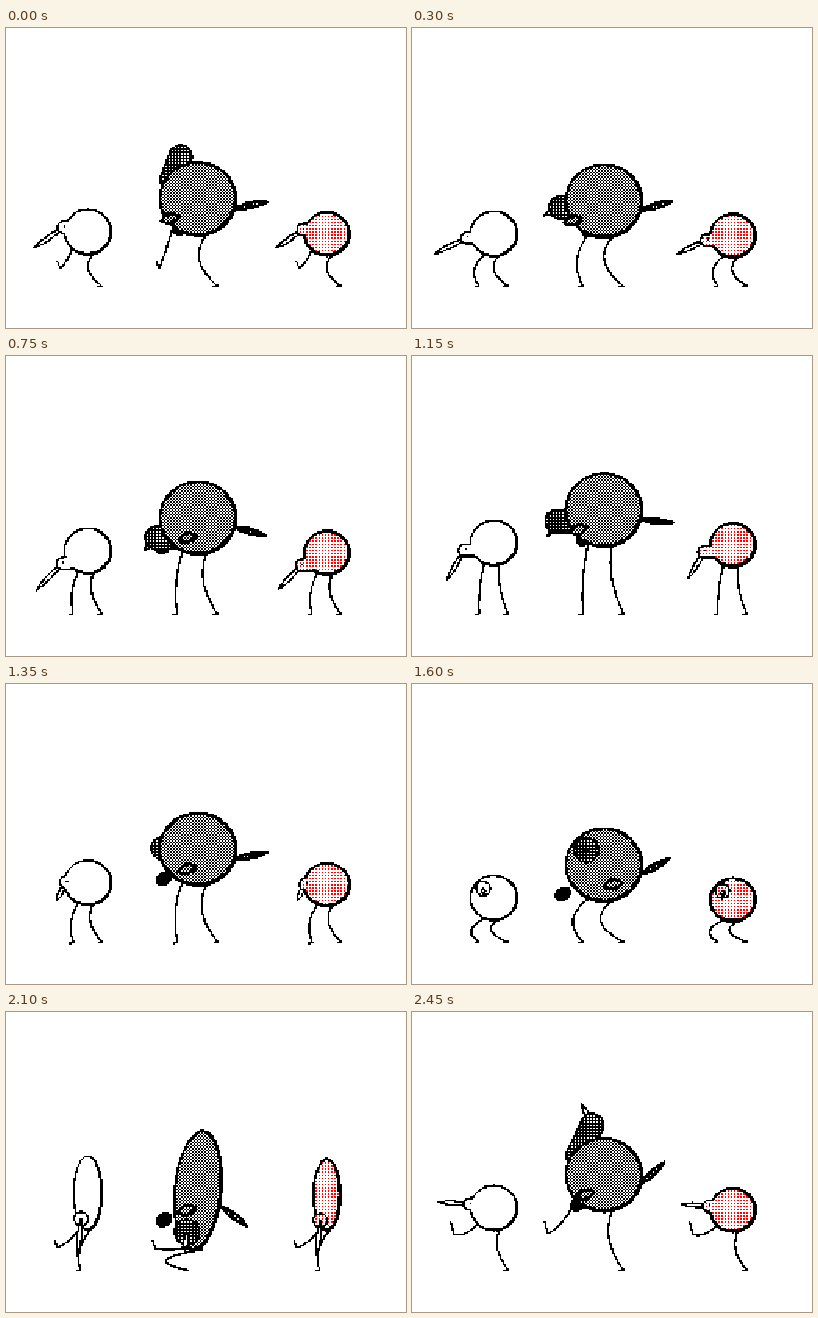
Animation of 400 by 300 pixels, one loop 2500 ms. Source, as an HTML page with a canvas:

```html
<!DOCTYPE html>
<html lang="en">
<head>
<meta charset="utf-8">
<title>Dancing birds</title>
<style>
html, body { margin: 0; width: 100%; height: 100%; overflow: hidden; background: #fff; }
canvas { display: block; width: 400px; height: 300px; image-rendering: pixelated; }
</style>
</head>
<body>
<canvas id="stage" width="256" height="192"></canvas>
<script>
const LOOP = 2500, STEP = 50, GROUND = 258, PIXEL = 400 / 256;
const ctx = document.getElementById('stage').getContext('2d', { willReadFrequently: true });

// A two-by-two halftone aligned to the coarse pixels.
function halftone(base, dot, ...dots) {
  const tile = document.createElement('canvas');
  tile.width = tile.height = 2;
  const c = tile.getContext('2d');
  c.fillStyle = base;
  c.fillRect(0, 0, 2, 2);
  c.fillStyle = dot;
  for (const [x, y] of dots) c.fillRect(x, y, 1, 1);
  const pattern = ctx.createPattern(tile, 'repeat');
  pattern.setTransform(new DOMMatrix().scale(PIXEL));
  return pattern;
}
const GREY = halftone('#fff', '#000', [0, 0], [1, 1]);
const DARK = halftone('#000', '#fff', [0, 0]);
const RED = halftone('#fff', '#f00', [0, 0]);

const birds = [
  { x: 82, y: 204, r: 24.5, fill: '#fff', headFill: '#fff', line: 2.5, headR: 5, beak: 1, stride: 1, legLength: 48, dip: 0, rear: 0 },
  { x: 192, y: 171, r: 39.5, fill: GREY, headFill: DARK, line: 3.2, headR: 10.5, beak: 0.5, stride: 1.4, legLength: 64, dip: 50, rear: 1 },
  { x: 321, y: 206, r: 24, fill: RED, headFill: RED, line: 3.2, headR: 5, beak: 0.9, stride: 1, legLength: 48, dip: 0, rear: 0 }
];

// The shared dance. Head is in body radii, tail is an angle, the rest is in pixels.
const poses = [
  { t: 0, bob: 0, width: 1, headX: -1, headY: -0.2, beakX: -30, beakY: 21, rear: 0.8, lift: 18, tail: -0.2, wing: -28 },
  { t: 300, bob: 2, width: 1, headX: -1.1, headY: 0.17, beakX: -33, beakY: 16, rear: 0, lift: 0, tail: -0.28, wing: -31 },
  { t: 750, bob: -9, width: 1, headX: -1.05, headY: 0.52, beakX: -26, beakY: 27, rear: 0, lift: 0, tail: 0.25, wing: -10 },
  { t: 1150, bob: -17, width: 1, headX: -1.2, headY: 0.3, beakX: -18, beakY: 30, rear: 0, lift: 0, tail: 0.09, wing: -25 },
  { t: 1600, bob: 10, width: 1, headX: -0.45, headY: -0.4, beakX: 1, beakY: 5, rear: 0, lift: 0, tail: -0.5, wing: 9 },
  { t: 2100, bob: -23, width: 0.62, headX: -0.45, headY: 0.68, beakX: -4, beakY: 38, rear: 0, lift: 22, tail: 0.65, wing: -11 },
  { t: 2450, bob: -8, width: 1, headX: -1, headY: -0.17, beakX: -31, beakY: -2, rear: 1, lift: 36, tail: -0.75, wing: -19 }
];

// Cyclic cubic interpolation with softened tangents.
function poseAt(t) {
  const n = poses.length;
  const key = k => poses[(k + n) % n];
  const time = k => key(k).t + LOOP * Math.floor(k / n);
  let i = n - 1;
  while (poses[i].t > t) i--;
  const h = time(i + 1) - time(i), u = (t - time(i)) / h, v = 1 - u;
  const result = {};
  for (const name in poses[i]) {
    const slope = k => (key(k + 1)[name] - key(k)[name]) / (time(k + 1) - time(k));
    const tangent = k => {
      const before = time(k) - time(k - 1), after = time(k + 1) - time(k);
      return 0.5 * (slope(k - 1) * after + slope(k) * before) / (before + after);
    };
    result[name] = key(i)[name] * v * v * (1 + 2 * u) + key(i + 1)[name] * u * u * (3 - 2 * u)
      + h * u * v * (tangent(i) * v - tangent(i + 1) * u);
  }
  return result;
}

function ellipse(x, y, rx, ry, fill, angle = 0) {
  ctx.beginPath();
  ctx.ellipse(x, y, rx, ry, angle, 0, 2 * Math.PI);
  ctx.fillStyle = fill;
  ctx.fill();
}

function stroke(width, color = '#000') {
  ctx.lineWidth = width;
  ctx.strokeStyle = color;
  ctx.stroke();
}

function capsule(x0, y0, x1, y1, radius, color) {
  ctx.beginPath();
  ctx.moveTo(x0, y0);
  ctx.lineTo(x1 + 0.01, y1);
  stroke(2 * radius, color);
}

// A pointed leaf, used for beaks, tails and wings.
function leaf(x, y, dx, dy, width, fill, line) {
  const length = Math.hypot(dx, dy) || 1;
  const nx = -dy / length * width, ny = dx / length * width;
  const mx = x + dx / 2, my = y + dy / 2;
  ctx.beginPath();
  ctx.moveTo(x, y);
  ctx.quadraticCurveTo(mx + nx, my + ny, x + dx, y + dy);
  ctx.quadraticCurveTo(mx - nx, my - ny, x, y);
  ctx.fillStyle = fill;
  ctx.fill();
  stroke(line);
}

// The knee bends further the lower the hip and the wider the step.
function leg(bird, hipX, hipY, footX, lift) {
  const footY = GROUND - lift;
  const crouch = Math.max(0, bird.legLength - (GROUND - hipY));
  const bend = 0.35 * bird.stride * (crouch + Math.abs(footX - hipX)) * Math.max(0, 1 - lift / 15);
  const kneeX = (hipX + footX) / 2 - 2 * bend;
  const kneeY = (hipY + footY) / 2 + lift / 4;
  ctx.beginPath();
  ctx.moveTo(hipX, hipY);
  ctx.quadraticCurveTo(kneeX, kneeY, footX, footY);
  if (lift > 10) ctx.lineTo(footX - 3, footY - lift / 3);
  else ctx.lineTo(footX - 4, footY + 1);
  stroke(1.9);
}

function drawBird(bird, pose) {
  const { stride } = bird, tailed = bird.rear > 0;
  const rx = bird.r * pose.width, ry = bird.r * 0.96 / pose.width;
  const stretch = 1 / pose.width - 1;
  const cx = bird.x, cy = bird.y + pose.bob + bird.dip * stretch;
  const rear = pose.rear * bird.rear;
  const headX = cx + rx * (pose.headX + 0.7 * rear);
  const headY = cy + ry * (pose.headY - 1.15 * rear);
  const front = pose.headX > -0.75;
  const neckX = front ? headX : cx - 0.67 * rx;
  const neckY = front ? headY : Math.max(cy - ry / 2, Math.min(cy + ry / 2, headY));
  const headR = bird.headR + (front ? 1 : 0);
  const tilt = bird.dip * stretch * 0.003;

  const drawBeak = () => leaf(headX, headY, pose.beakX * bird.beak + 5 * rear,
    pose.beakY * bird.beak - 20 * rear, 4.5, '#fff', 1.8);
  const outlineHead = () => capsule(headX, headY, neckX, neckY, headR + 2, '#000');
  const fillHead = () => capsule(headX, headY, neckX, neckY, headR, bird.headFill);
  const drawLeg = (side, footX, lift) => leg(bird, cx + side * rx,
    cy + ry * Math.sqrt(1 - side * side) - 1, cx + footX * stride, lift);

  drawLeg(0.2, 14 - 35 * stretch, 0);
  drawLeg(-0.4 - 0.3 * pose.rear, -15 - 0.7 * pose.lift, pose.lift);
  if (tailed) ellipse(cx - Math.min(41, 45 + pose.wing), cy + 29, 9, 7, '#000', -0.6);
  if (!front) {
    drawBeak();
    outlineHead();
    if (tailed) fillHead();
  }
  ellipse(cx, cy, rx, ry, '#000', tilt);
  if (!front && !tailed) fillHead();
  ellipse(cx - 0.5, cy - 0.5, rx - bird.line, ry - bird.line, bird.fill, tilt);
  if (tailed) {
    leaf(cx + 0.92 * rx, cy + 0.25 * ry, 33 * Math.cos(pose.tail), 33 * Math.sin(pose.tail), 5, DARK, 3);
    leaf(cx + pose.wing - 9, cy + 22, 18, -5, 9, GREY, 3);
  }
  if (front) {
    outlineHead();
    fillHead();
    drawBeak();
  } else if (!tailed) {
    ellipse(headX + 1, headY - 1, 1.2, 1.2, '#000');
  }
}

// Snap every channel to on or off for hard pixel edges.
function harden() {
  const image = ctx.getImageData(0, 0, 256, 192), data = image.data;
  for (let i = 0; i < data.length; i++) data[i] = data[i] > 135 ? 255 : 0;
  ctx.putImageData(image, 0, 0);
}

function frame() {
  const pose = poseAt(Math.floor(performance.now() / STEP) * STEP % LOOP);
  ctx.setTransform(1 / PIXEL, 0, 0, 1 / PIXEL, 0, 0);
  ctx.imageSmoothingEnabled = false;
  ctx.lineCap = ctx.lineJoin = 'round';
  ctx.fillStyle = '#fff';
  ctx.fillRect(0, 0, 400, 300);
  for (const bird of birds) drawBird(bird, pose);
  harden();
  requestAnimationFrame(frame);
}
frame();
</script>
</body>
</html>
```
